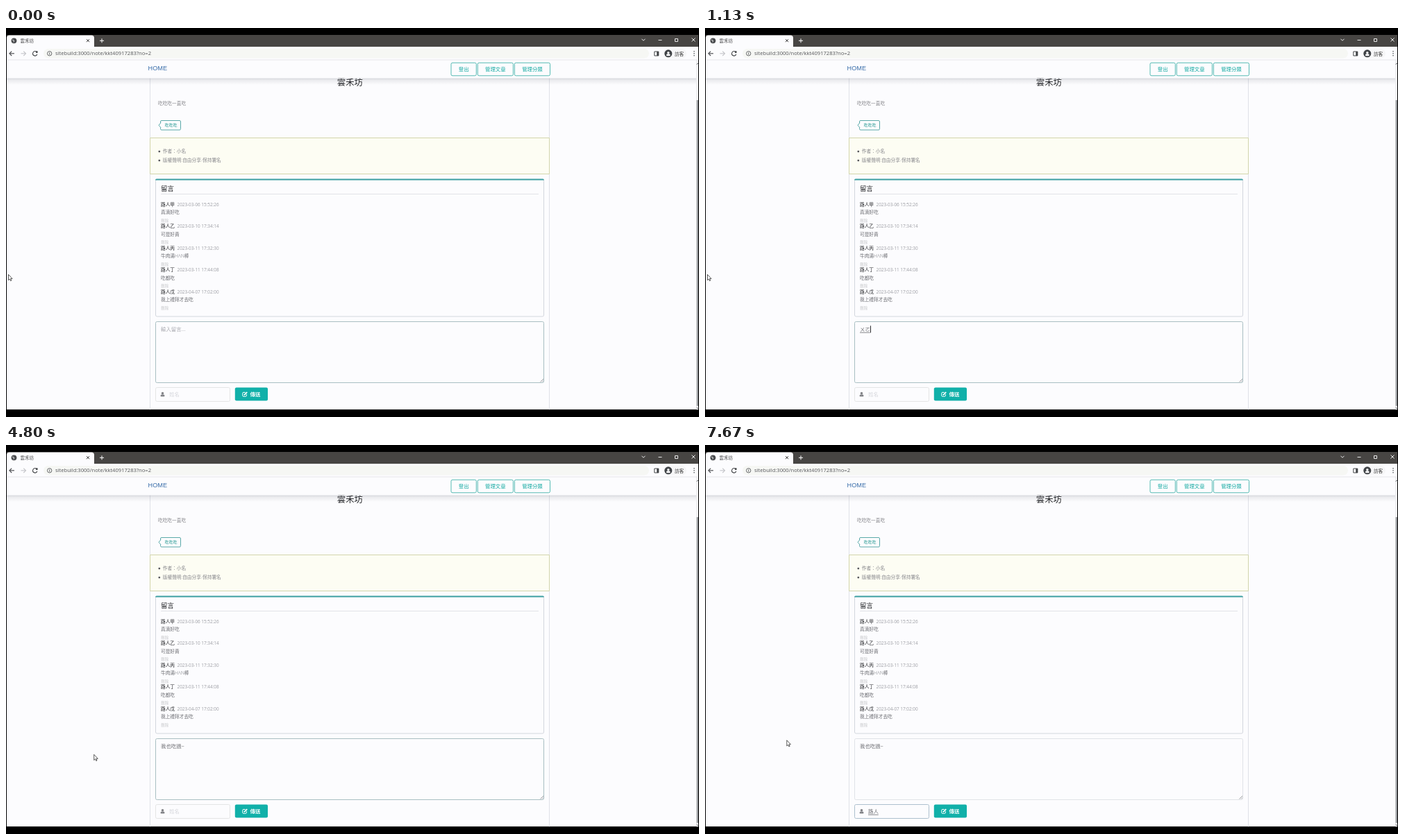
Write an HTML page with a canvas that moves like this. It is 998 px wide and 561 px high and loops after 8000 ms.

```html
<!DOCTYPE html>
<html lang="zh-Hant">
<head>
<meta charset="utf-8">
<title>Blog comment</title>
<style>
html, body { margin: 0; width: 100%; height: 100%; overflow: hidden; background: #000; }
canvas { display: block; width: 998px; height: 561px; }
</style>
</head>
<body>
<canvas id="stage" width="998" height="561"></canvas>
<script>
const ctx = document.getElementById('stage').getContext('2d');
const LOOP = 8000, BLINK = 530, KEY_GAP = 135, FOCUS_NAME = 5330;
const UI = '"Open Sans", "Noto Sans CJK TC", "Noto Sans CJK JP", "Noto Sans CJK", sans-serif';
const ARIAL = '"Liberation Sans", sans-serif';
const PAGE = '#fcfcfe', TEAL = '#14aaa2', INK = '#222326', GREY = '#85858a', ICON = '#444649', PALE = '#dfe1e8';
const TITLE = '雲禾坊';
const SMALL = 6.7, FIELD = 7.4;

const comments = [
  ['甲', '2023-03-06 15:52:26', '真滴好吃'],
  ['乙', '2023-03-10 17:34:14', '可是好貴'],
  ['丙', '2023-03-11 17:32:30', '牛肉湯HAN棒'],
  ['丁', '2023-03-11 17:44:08', '吃都吃'],
  ['戊', '2023-04-07 17:02:00', '我上禮拜才去吃']
];

// Each syllable: phonetic keys, resulting character, first key time, conversion time
const message = {
  focusAt: -590,
  syllables: [['ㄨㄛ', '我', 730, 1870], ['ㄧㄝ', '也', 2130, 2460], ['ㄔ', '吃', 2670, 2800], ['ㄍㄨㄛ', '過', 2930, 3200]],
  commitAt: 3600, suffix: '~', suffixAt: 3930
};
const author = {
  focusAt: FOCUS_NAME,
  syllables: [['ㄌㄨ', '路', 6330, 6660], ['ㄖㄣ', '人', 6870, 7140]],
  commitAt: Infinity
};

const HOME_POINT = [3.5, 355.5];
const moves = [
  { from: 4400, to: 5200, point: [249, 536.5] },
  { from: 5400, to: 5870, point: [91, 440] },
  { from: 6100, to: 6330, point: [117.8, 425.8] }
];

function text(str, x, y, size, color, { weight = 400, align = 'left', font = UI } = {}) {
  ctx.font = `${weight} ${size}px ${font}`;
  ctx.textAlign = align;
  ctx.fillStyle = color;
  ctx.fillText(str, x, y + size * 0.38);
}

function rect(x, y, w, h, color) {
  ctx.fillStyle = color;
  ctx.fillRect(x, y, w, h);
}

function box(x, y, w, h, r, stroke, fill) {
  ctx.beginPath();
  ctx.roundRect(x, y, w, h, r);
  if (fill) { ctx.fillStyle = fill; ctx.fill(); }
  if (stroke) { ctx.strokeStyle = stroke; ctx.lineWidth = 1; ctx.stroke(); }
}

function disc(x, y, r, color) {
  ctx.beginPath();
  ctx.arc(x, y, r, 0, Math.PI * 2);
  ctx.fillStyle = color;
  ctx.fill();
}

function line(color, width, ...points) {
  ctx.beginPath();
  for (const [x, y] of points) ctx.lineTo(x, y);
  ctx.strokeStyle = color;
  ctx.lineWidth = width;
  ctx.stroke();
}

function cross(x, y, r, color) {
  for (const s of [-1, 1]) line(color, 1, [x - r, y - r * s], [x + r, y + r * s]);
}

// dir is 1 for pointing down, -1 for up
function chevron(x, y, r, dir, color) {
  line(color, 1, [x - r, y - r * dir / 2], [x, y + r * dir / 2], [x + r, y - r * dir / 2]);
}

// dir is 1 for pointing right, -1 for left
function arrow(x, y, dir, color) {
  const tip = x + 3.5 * dir, back = tip - 3.2 * dir;
  line(color, 1.1, [x - 3.5 * dir, y], [tip, y]);
  line(color, 1.1, [back, y - 3.2], [tip, y], [back, y + 3.2]);
}

function person(x, y, s, color) {
  disc(x, y - 1.8 * s, 1.8 * s, color);
  box(x - 3 * s, y, 6 * s, 3 * s, [2 * s, 2 * s, s, s], null, color);
}

function drawTabs() {
  rect(1, 10, 996, 17, '#474543');
  box(1, 10.5, 126, 18, [4, 4, 0, 0], null, PAGE);
  disc(11.5, 18.3, 3.9, '#4b4d50');
  line('#e4e5e6', 1, [9, 17], [11.5, 18], [11, 20.5]);
  text(TITLE, 20.5, 18.5, 6.5, '#4a4a4c');
  cross(118, 18.2, 2, '#333');
  rect(135, 17.8, 6, 1, '#fff');
  rect(137.5, 15.3, 1, 6, '#fff');
  chevron(918, 17, 2.5, 1, '#e8e8e8');
  rect(939.5, 17, 5, 1, '#e8e8e8');
  box(963.5, 15.5, 4, 4, 0, '#e8e8e8');
  cross(990, 17, 2.5, '#e8e8e8');
}

function drawToolbar() {
  const y = 36.8;
  rect(1, 27, 996, 19, PAGE);
  arrow(8.5, y, -1, ICON);
  arrow(25, y, 1, '#c3c4c8');
  ctx.beginPath();
  ctx.arc(41.8, y, 3.2, 0.3, 5.5);
  ctx.stroke(new Path2D());
  ctx.strokeStyle = ICON;
  ctx.stroke();
  rect(43, 33.3, 2.6, 2.6, ICON);

  box(54, 30, 872, 13.5, 6.7, null, '#f6f7f4');
  box(59.5, y - 3.2, 6.4, 6.4, 3.2, '#66686b');
  rect(62.2, 36.3, 1, 2.2, '#55575a');
  rect(62.2, 34.8, 1, 0.9, '#55575a');
  text('sitebuild:3000/note/kkt40917283?no=2', 71, 36.4, 7.6, '#55565a');

  box(933.8, 34, 6, 6, 0, ICON);
  rect(937.2, 34, 2.8, 6, ICON);
  box(946, 30, 34, 13.5, 6.7, null, '#f6f6f7');
  disc(953.8, y, 5.5, '#3f4246');
  person(953.8, 37.3, 0.95, PAGE);
  text('訪客', 963, 37, 6.6, '#333', { weight: 500 });
  for (const i of [-1, 0, 1]) disc(991, y + 3 * i, 0.8, ICON);
  rect(1, 45.6, 996, 0.8, '#dedee4');
}

function drawNav() {
  const shade = ctx.createLinearGradient(0, 72, 0, 82);
  shade.addColorStop(0, 'rgba(70,75,90,.22)');
  shade.addColorStop(0.35, 'rgba(70,75,90,.09)');
  shade.addColorStop(1, 'rgba(70,75,90,0)');
  rect(1, 72, 993, 10, shade);
  rect(1, 46, 993, 26.5, PAGE);
  text('HOME', 204.6, 57.8, 9.15, '#3a6eaa', { font: ARIAL });
  let x = 641;
  for (const label of ['登出', '管理文章', '管理分類']) {
    const w = label.length * FIELD + 21.5;
    box(x, 50.2, w, 18.6, 2, '#55bab3');
    text(label, x + w / 2, 59.5, FIELD, TEAL, { weight: 500, align: 'center' });
    x += w + 2;
  }
}

function drawScrollbar() {
  rect(994, 46, 3, 505, '#f1f1f4');
  rect(994.6, 104, 2.4, 441, '#96989c');
  chevron(996, 51.8, 1.4, -1, '#55575a');
  chevron(996, 548, 1.4, 1, '#55575a');
}

function drawArticle() {
  for (const x of [207, 782]) rect(x, 72, 1, 479, PALE);
  text(TITLE, 495.3, 78.5, 12.3, INK, { weight: 500, align: 'center' });
  text('吃吃吃一直吃', 219, 108.7, SMALL, GREY, { weight: 300 });

  box(222.5, 133.5, 29, 13.5, 1.5, '#5aa9a9', PAGE);
  rect(222, 137, 1.2, 6.4, PAGE);
  line('#5aa9a9', 1, [223, 136.6], [220, 140.2], [223, 143.8]);
  text('吃吃吃', 228.4, 139.7, 6, '#1e968f', { weight: 500 });

  box(207.5, 158.5, 575, 52, 0, '#d2d5ab', '#fdfdf3');
  ['作者：小名', '版權聲明:自由分享-保持署名'].forEach((str, i) => {
    const y = 177.6 + 13 * i;
    disc(220.8, y + 0.5, 1.4, '#55565a');
    text(str, 225.8, y, SMALL, GREY, { weight: 300 });
  });
}

function drawComments() {
  box(215.5, 218.5, 559, 197.5, 2, '#d3d7dd');
  box(215, 217.6, 560, 1.9, [2, 2, 0, 0], null, '#3c9fa2');
  text('留言', 223, 231.3, 9.4, INK, { weight: 500 });
  rect(223, 239, 544, 1, '#e2e3e8');
  comments.forEach(([mark, when, body], i) => {
    const y = 254.4 + i * 31.5;
    text('路人' + mark, 223, y, SMALL, INK, { weight: 500 });
    text(when, 246.5, y, 6.36, '#9c9da3');
    text(body, 223, y + 11.2, SMALL, '#6a6b70', { weight: 300 });
    text('刪除', 223.3, y + 23.5, 5.4, '#c6c7ca');
  });
}

// Text, underline state and time of the latest keystroke
function typed(field, t) {
  let value = '', last = field.focusAt;
  for (const [keys, char, start, end] of field.syllables) {
    if (t < start) break;
    const gap = Math.min(KEY_GAP, (end - start) / keys.length);
    const count = Math.min(keys.length, Math.floor((t - start) / gap) + 1);
    const done = t >= end;
    value += done ? char : keys.slice(0, count);
    last = done ? end : start + (count - 1) * gap;
  }
  const committed = t >= field.commitAt;
  if (committed) last = field.commitAt;
  if (t >= field.suffixAt) {
    value += field.suffix;
    last = field.suffixAt;
  }
  return { value, last, composing: !committed };
}

function drawField(field, t, focused, x, y, hint, hintColor) {
  const { value, last, composing } = typed(field, t);
  text(value || hint, x, y, FIELD, value ? '#6c6d71' : hintColor);
  const width = ctx.measureText(value).width;
  if (composing) rect(x, y + 4.4, width, 0.8, '#6c6d71');
  if (focused && (t - last) % (BLINK * 2) < BLINK) rect(Math.round(x + width), y - 5, 1, 10, '#2c2c2e');
}

function drawForm(t) {
  const onName = t >= FOCUS_NAME;
  box(215.5, 423.5, 559, 88, 2, onName ? '#e0e3e7' : '#a9bfc2', PAGE);
  for (const d of [2, 4.5]) line('#85868a', 0.8, [774 - d, 510.5], [774, 510.5 - d]);
  drawField(message, t, !onName, 223, 434.4, '輸入留言...', '#a9aab0');

  box(215.5, 518.5, 107, 20, 2, onName ? '#adc0ce' : '#e4e5e5', PAGE);
  person(225.5, 528.6, 1, '#828387');
  drawField(author, t, onName, 235, 528.4, '姓名', onName ? '#a9aab0' : '#d6d7dc');

  box(329.8, 518.5, 47.2, 19, 2, null, '#11b0a9');
  box(340.8, 525.5, 5.6, 5.8, 1, '#fff');
  line('#11b0a9', 3.2, [343, 529.3], [348, 524.3]);
  line('#fff', 1.7, [343, 529.3], [347.2, 525.1]);
  text('傳送', 351.6, 528, FIELD, '#fff', { weight: 700 });
}

function pointerAt(t) {
  let [x, y] = HOME_POINT;
  for (const { from, to, point } of moves) {
    const u = Math.min(1, Math.max(0, (t - from) / (to - from)));
    const e = u * u * (3 - 2 * u);
    x += (point[0] - x) * e;
    y += (point[1] - y) * e;
  }
  return [x, y];
}

function drawPointer(t) {
  const [x, y] = pointerAt(t);
  const overField = x > 215 && y > 423 && (y < 512 || y > 518);
  ctx.save();
  ctx.translate(x, y);
  if (overField) {
    line('#333', 1, [0, -4], [0, 4]);
    for (const end of [-4, 4]) line('#333', 1, [-2, end], [2, end]);
  } else {
    const head = new Path2D('M0 0V8.2L1.9 6.5L3.1 9.2L4.3 8.7L3.2 6H5.6Z');
    ctx.fillStyle = '#fff';
    ctx.fill(head);
    ctx.strokeStyle = '#333';
    ctx.lineWidth = 0.8;
    ctx.stroke(head);
  }
  ctx.restore();
}

function draw(t) {
  rect(0, 0, 998, 561, '#000');
  rect(1, 46, 996, 504.4, PAGE);
  drawArticle();
  drawComments();
  drawForm(t);
  drawNav();
  drawScrollbar();
  rect(0, 550.4, 998, 10.6, '#000');
  drawTabs();
  drawToolbar();
  drawPointer(t);
}

const start = performance.now();
function tick() {
  draw((performance.now() - start) % LOOP);
  requestAnimationFrame(tick);
}
tick();
</script>
</body>
</html>
```
